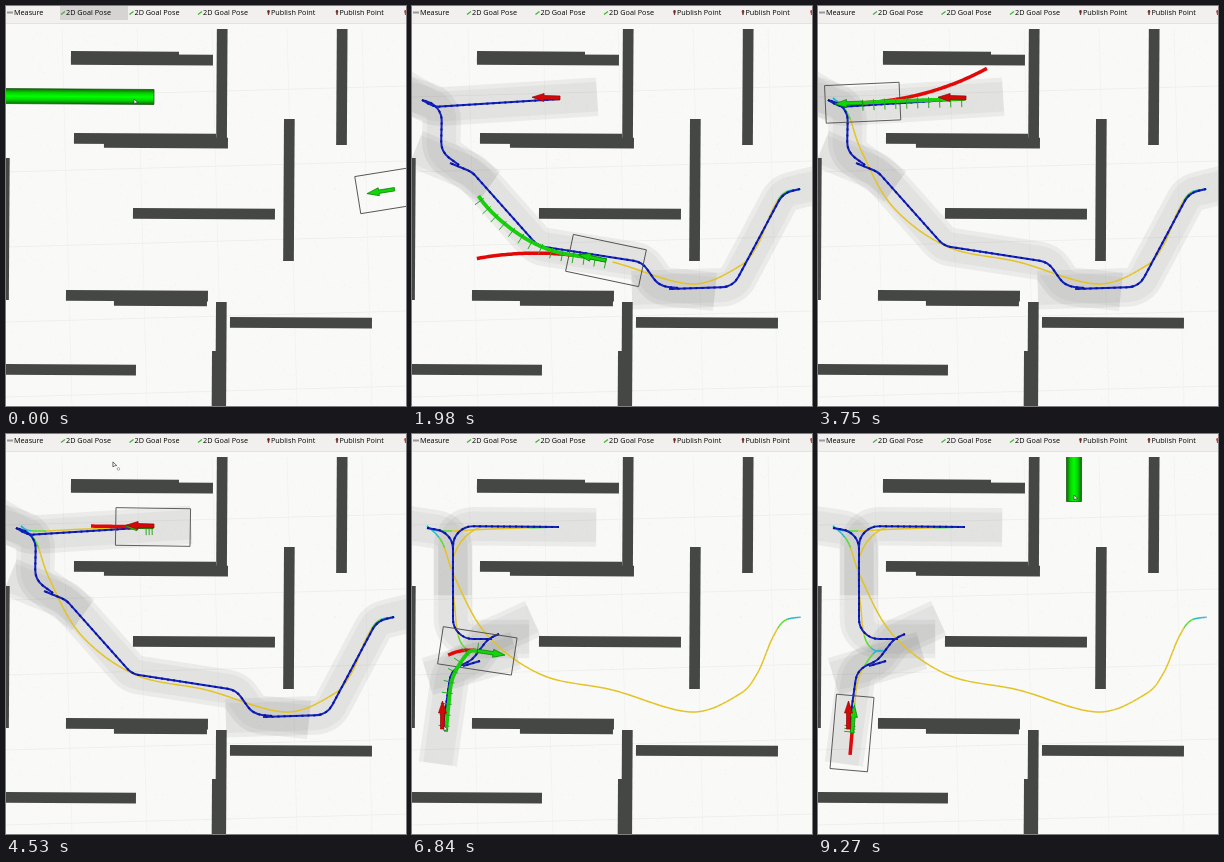
Recreate the animation shown at these times as an HTML page with a canvas. Size 400 by 400 pixels, loop 9300 ms.

```html
<!DOCTYPE html>
<html>
<head>
<meta charset="utf-8">
<style>
html, body { margin: 0; width: 100%; height: 100%; overflow: hidden; background: #f9f9f8 }
canvas { display: block }
</style>
</head>
<body>
<canvas id="stage" width="400" height="400"></canvas>
<script>
const LOOP = 9300, SPEED = .198, RAMP = 300;
const RELEASE = [330, 5230], DEPART = [593, 5316], PARKED_ARC = [62, 22];
const BAR = 142, LENGTH = 74.6, WIDTH = 37.6;
const ctx = document.getElementById('stage').getContext('2d');

let seed = 7;
const rnd = () => (seed = seed * 16807 % 2147483647) / 2147483647;
const clamp = (v, lo, hi) => Math.min(Math.max(v, lo), hi);
const parse = s => s.split(' ').map(p => p.split(',').map(Number));

// Control points of the drive; odd legs are reversed
const legs = [
  '388.6,183.2 372,187 360,205 345,240 326,261 278,278 200.5,256 130,241 75,201 43.5,145 30,108 15,92',
  '15,92 28,97 80,95 147,93',
  '147,93 95,92.5 62,96 41,125 43,176 47,204 56,216 67,217',
  '67,217 56,219 41,243 36.5,272 34,299'
].map(parse);

// Corners of the two plans, rounded when drawn
const plans = [
  ['388,183 371,187 321,281 257,283', '266,282 247,280 230,256 126,240 60,166 38,157',
    '47,159 29,146 30,100 10,94', '10,94 22,101 148,93'],
  ['147,93 41,92 41,205 80,205', '15,94 41,98 41,124', '87,200 76,205 60,226 39,236 31,293', '68,227 51,232']
].map(p => p.map(parse));

const rows = '65,48 68,127 98,131,124 127,202 60,284 108,289,93 65,45,108 224,311 -12,358';
const columns = '211,0 331,-3 278,113 210,296 206,345 -7,152';

function spline(a, b, c, d, u) {
  return b + u * ((c - a) / 2 + u * (a - 2.5 * b + 2 * c - d / 2 + u * (1.5 * (b - c) + (d - a) / 2)));
}

// Sample every leg by arc length
let total = 0;
const tracks = legs.map((pts, leg) => {
  const out = [], n = (pts.length - 1) * 10, pick = i => pts[clamp(i, 0, pts.length - 1)];
  for (let k = 0; k <= n; k++) {
    const i = Math.min(Math.floor(k / 10), pts.length - 2);
    const [x, y] = [0, 1].map(c => spline(...[-1, 0, 1, 2].map(o => pick(i + o)[c]), k / 10 - i));
    if (k) total += Math.hypot(x - out[k - 1].x, y - out[k - 1].y);
    out.push({ x, y, leg, s: total });
  }
  out.forEach((p, i) => {
    const a = out[Math.max(i - 1, 0)], b = out[Math.min(i + 1, n)];
    p.dir = Math.atan2(b.y - a.y, b.x - a.x);
  });
  return out;
});
const route = tracks.flat();
const starts = tracks.map(t => t[0].s), ends = tracks.map(t => t[t.length - 1].s);

const turn = (a, b) => Math.atan2(Math.sin(b - a), Math.cos(b - a));

function poseAt(s) {
  const i = route.findIndex(p => p.s > s);
  const b = i < 0 ? route[route.length - 1] : route[i], a = route[i < 1 ? route.length - 1 : i - 1];
  const u = i < 1 ? 1 : (s - a.s) / (b.s - a.s);
  const dir = a.dir + turn(a.dir, b.dir) * u;
  return { x: a.x + (b.x - a.x) * u, y: a.y + (b.y - a.y) * u, leg: b.leg, dir,
    head: dir + (b.leg % 2 ? Math.PI : 0) };
}

// Each leg speeds up, cruises and brakes; the legs of a trip follow directly
const timing = [];
legs.forEach((_, i) => {
  const from = i % 2 ? timing[i - 1].to : DEPART[i / 2];
  timing.push({ from, to: from + (ends[i] - starts[i]) / SPEED + RAMP });
});

function distance(t) {
  return timing.reduce((sum, { from, to }) => {
    const d = clamp(t, from, to) - from, left = to - from - d;
    const lag = d < RAMP ? d - d * d / (2 * RAMP) : RAMP / 2;
    const brake = left < RAMP ? (RAMP - left) ** 2 / (2 * RAMP) : 0;
    return sum + SPEED * (d - lag - brake);
  }, 0);
}

function line(c, pts, color, width, radius = 0) {
  c.beginPath();
  c.moveTo(...pts[0]);
  pts.slice(1).forEach((p, i) => pts[i + 2] && radius ? c.arcTo(...p, ...pts[i + 2], radius) : c.lineTo(...p));
  c.strokeStyle = color;
  c.lineWidth = width;
  c.lineJoin = 'round';
  c.stroke();
}

function shape(pts, fill, stroke) {
  ctx.beginPath();
  pts.forEach(p => ctx.lineTo(...p));
  ctx.closePath();
  ctx.fillStyle = fill;
  ctx.fill();
  ctx.strokeStyle = stroke;
  ctx.lineWidth = .7;
  ctx.stroke();
}

function at(c, x, y, angle, draw) {
  c.save();
  c.translate(x, y);
  c.rotate(angle);
  draw();
  c.restore();
}

function layer(paint) {
  const c = document.createElement('canvas');
  c.width = c.height = 400;
  paint(c.getContext('2d'));
  return c;
}

function speckle(c, n, color) {
  c.fillStyle = color;
  for (let i = 0; i < n; i++) c.fillRect(rnd() * 400, 23 + rnd() * 377, 1, 1);
}

const floor = layer(c => {
  c.fillStyle = '#f9f9f8';
  c.fillRect(0, 0, 400, 400);
  for (let i = 0; i < 6; i++) {
    line(c, [[0, 91 + i * 75], [400, 80 + i * 75]], '#efefee', 1);
    line(c, [[56 + i * 75, 23], [66 + i * 75, 400]], '#f3f3f2', 1);
  }
  speckle(c, 1800, '#f2f2f1');
});

const walls = layer(c => {
  c.fillStyle = '#454745';
  const bars = (list, box) => parse(list).forEach(([x, y, len = BAR]) =>
    at(c, x, y, .006, () => c.fillRect(0, 0, ...box(len))));
  bars(rows, len => [len, 10.7]);
  bars(columns, len => [10.7, len]);
});

// The vehicle overhangs both ends of each stretch it sweeps
function overhang(pts) {
  const past = ([ax, ay], [bx, by]) => {
    const k = LENGTH / 2 / Math.hypot(bx - ax, by - ay);
    return [bx + (bx - ax) * k, by + (by - ay) * k];
  };
  const n = pts.length;
  return [past(pts[1], pts[0]), ...pts.slice(1, -1), past(pts[n - 2], pts[n - 1])];
}

const swaths = plans.map(lines => layer(c => {
  lines.map(overhang).forEach(l => {
    line(c, l, 'rgba(0,0,0,.055)', WIDTH + 1, 20);
    line(c, l, 'rgba(0,0,0,.035)', WIDTH - 8, 20);
  });
  c.globalCompositeOperation = 'source-atop';
  speckle(c, 9000, 'rgba(0,0,0,.13)');
}));

function arrow(x, y, angle, color, edge, half) {
  at(ctx, x, y, angle, () =>
    shape([[0, -half], [16, -half], [16, -4], [28, 0], [16, 4], [16, half], [0, half]], color, edge));
}

function dragArrow(x, y, angle) {
  at(ctx, x, y, angle, () => {
    const g = ctx.createLinearGradient(0, -7.5, 0, 7.5);
    ['#0a6a00', '#06cf00', '#00ff00', '#06cf00', '#0a6a00'].forEach((k, i) => g.addColorStop(i / 4, k));
    shape([[0, -7.5], [180, -7.5], [180, -15], [230, 0], [180, 15], [180, 7.5], [0, 7.5]], g, '#174d10');
  });
}

function drawTrace(s) {
  for (let i = 1; i < route.length && route[i].s <= s; i++) {
    const a = route[i - 1], b = route[i];
    const edge = Math.min(b.s - starts[b.leg], ends[b.leg] - b.s);
    const color = edge < 14 ? '#25b5c9' : edge < 28 ? '#55dc28' : '#e3c322';
    line(ctx, [[a.x, a.y], [b.x, b.y]], color, 1.5);
  }
}

function drawPlan(lines) {
  lines.forEach(l => {
    line(ctx, l, '#1322c4', 2, 20);
    ctx.setLineDash([2, 4]);
    line(ctx, l, '#0a148c', 2, 20);
    ctx.setLineDash([]);
  });
}

// Local trajectory with side ticks, up to the end of the trip
function drawHorizon(s, plan) {
  const end = ends[plan * 2 + 1], from = Math.min(s, end - 7), to = Math.min(s + 150, end);
  const step = to - from < 12 ? 3 : 11, pts = [];
  for (let d = from; d < to; d += 2) pts.push(poseAt(d));
  line(ctx, pts.map(p => [p.x, p.y]), '#18cf0c', 3.8);
  for (let d = from; d < to; d += step) {
    const p = poseAt(d), nx = Math.sin(p.head), ny = -Math.cos(p.head);
    line(ctx, [[p.x - nx * 3, p.y - ny * 3], [p.x + nx * 8, p.y + ny * 8]], '#2aa822', 1);
  }
}

// Steering arc: as long as the speed, bent like the nearby path
function drawArc(p, s, t, plan) {
  const speed = (distance(t + 5) - distance(t - 5)) / 10;
  const parked = t > timing[plan * 2 + 1].to;
  const length = parked ? PARKED_ARC[plan] : speed * 660;
  const near = d => poseAt(clamp(s + d, starts[p.leg] + .1, ends[p.leg] - .1)).dir;
  const bend = parked ? 0 : turn(near(-20), near(30)) / 50;
  const pts = [];
  let { x, y, dir } = p;
  for (let d = 0; d <= length; d += 2) {
    pts.push([x, y]);
    x += 2 * Math.cos(dir);
    y += 2 * Math.sin(dir);
    dir += 2 * bend;
  }
  line(ctx, pts, '#e30808', 3.5);
}

function drawToolbar(active) {
  const fill = (color, ...box) => { ctx.fillStyle = color; ctx.fillRect(...box); };
  fill('#f9f9f8', 0, 0, 400, 23);
  fill('#f1f0ef', 0, 0, 400, 17);
  fill('#e2e2e1', 0, 17, 400, 1);
  if (active) fill('#d5d4d3', 54, 0, 68, 14);
  fill('#999', 1, 5.5, 6, 2);
  ctx.font = '7.25px "Open Sans", sans-serif';
  const label = (text, x) => { ctx.fillStyle = '#000'; ctx.fillText(text, x, 9.3); };
  label('Measure', 8);
  for (let i = 0; i < 3; i++) {
    const x = 60 + i * 68.5, pin = x + 205, color = i < 2 ? '#6b2a2a' : '#d03030';
    line(ctx, [[x - 5, 8.5], [x - 1, 5.5]], '#37b52a', 1.2);
    label('2D Goal Pose', x);
    shape([[pin - 3.5, 5], [pin - 2.5, 4], [pin - 1.5, 5], [pin - 2.5, 9]], color, color);
    label('Publish Point', pin);
  }
}

// Time and place of the pointer's stops
const stops = parse('0,128,93 4300,128,93 4530,107,28 4750,88,7 4990,32,292 8300,32,292 8600,88,7 9050,256,61 9300,256,61');

function drawCursor(t) {
  if (t > 600 && t < 4250) return;
  const i = stops.findIndex(k => k[0] > t), [t0, ax, ay] = stops[i - 1], [t1, bx, by] = stops[i];
  const u = (t - t0) / (t1 - t0), x = ax + (bx - ax) * u, y = ay + (by - ay) * u;
  shape([[x, y], [x, y + 5], [x + 1.5, y + 4], [x + 3.8, y + 3.6]], '#fff', '#333');
  if (t > 4350 && t < 4700) {
    ctx.beginPath();
    ctx.arc(x + 5.5, y + 7, 1.3, 0, 7);
    ctx.strokeStyle = '#888';
    ctx.stroke();
  }
}

function draw(t) {
  const s = distance(t), p = poseAt(s);
  const plan = t < RELEASE[0] ? -1 : t < RELEASE[1] ? 0 : 1;
  const up = -Math.PI / 2;
  ctx.drawImage(floor, 0, 0);
  if (plan >= 0) ctx.drawImage(swaths[plan], 0, 0);
  ctx.drawImage(walls, 0, 0);
  drawTrace(s);
  if (plan >= 0) drawPlan(plans[plan]);
  at(ctx, p.x, p.y, p.head, () => {
    ctx.strokeStyle = '#505050';
    ctx.lineWidth = .9;
    ctx.strokeRect(-LENGTH / 2, -WIDTH / 2, LENGTH, WIDTH);
  });
  if (plan >= 0) {
    drawArc(p, s, t, plan);
    drawHorizon(s, plan);
  }
  arrow(p.x, p.y, p.head, '#12d60a', '#0c7a08', 1.7);
  if (plan === 0) arrow(148, 92, 3.17, '#d40808', '#8c0808', 2);
  if (plan === 1) arrow(30.5, 295, up, '#d40808', '#8c0808', 2);
  if (plan < 0) dragArrow(148, 91, 3.148);
  if (t >= 5000 && t < RELEASE[1]) dragArrow(30.5, 295, up);
  if (t >= 9080) dragArrow(256, 67.5, up);
  drawToolbar(plan < 0 || t > 4740 && t < RELEASE[1] || t > 8590 && t < 9080);
  drawCursor(t);
}

const start = performance.now();
function frame() {
  draw((performance.now() - start) % LOOP);
  requestAnimationFrame(frame);
}
frame();
</script>
</body>
</html>
```
